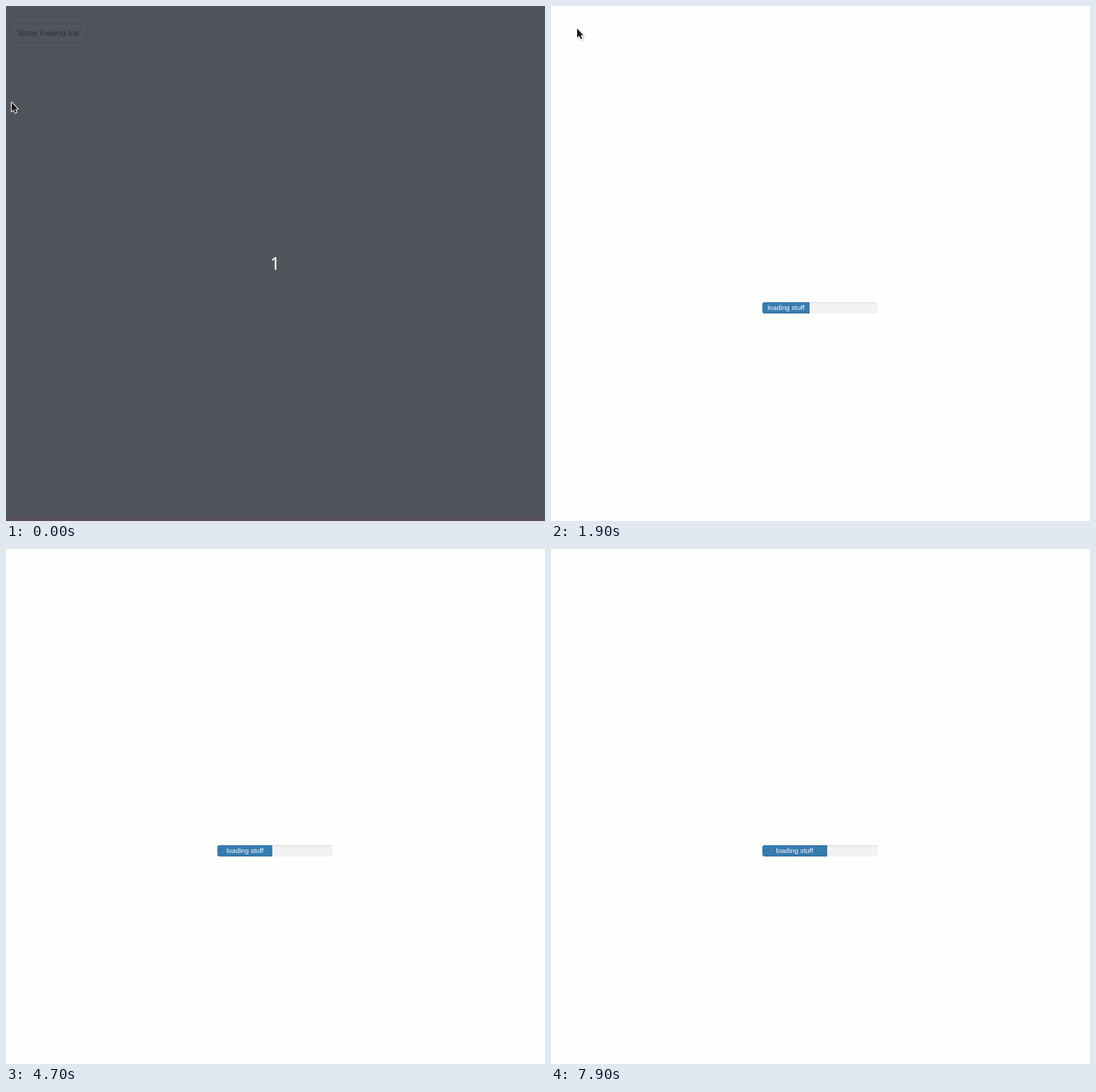
Recreate the animation shown at these times as an HTML page. Size 765 by 732 pixels, loop 8 s.

```html
<!DOCTYPE html>
<html lang="en">
<head>
<meta charset="utf-8">
<title>Loading bar</title>
<style>
  html, body {
    margin: 0;
    width: 100%;
    height: 100%;
    overflow: hidden;
  }
  body {
    position: relative;
    background: #fefefd;
    font-family: "Liberation Sans", Arial, sans-serif;
  }
  .button, .track, .cursor, .countdown { position: absolute; }
  .button, .track, .fill, .cursor, .countdown { animation: 8s linear infinite; }

  .button {
    left: 6px;
    top: 24.5px;
    box-sizing: border-box;
    width: 109px;
    height: 27.5px;
    border: 1px solid #ccc;
    border-radius: 3.3px;
    background: #fff;
    color: #333;
    font-size: 11.4px;
    line-height: 25.5px;
    text-align: center;
    white-space: nowrap;
    animation-name: press;
  }
  @keyframes press {
    0%, 9.9% { background: #fefefd; border-color: #ccc; visibility: visible; }
    10%, 12.4% { background: #e6e6e6; border-color: #adadad; visibility: visible; }
    12.5%, 100% { visibility: hidden; }
  }

  .track {
    left: 300px;
    top: 421px;
    width: 163px;
    height: 16.3px;
    border-radius: 3.3px;
    overflow: hidden;
    background: #f3f2f2;
    box-shadow: inset 0 1px 2px rgba(0, 0, 0, .1);
    animation-name: appear;
  }
  @keyframes appear {
    0%, 12.49% { visibility: hidden; }
    12.5%, 100% { visibility: visible; }
  }

  .fill {
    height: 100%;
    background: #367cae;
    box-shadow: inset 0 -1px rgba(0, 0, 0, .15);
    color: #fff;
    font-size: 9.8px;
    line-height: 16.3px;
    text-align: center;
    animation-name: load;
  }
  @keyframes load {
    0% { width: 0; }
    12.8% { width: 0; animation-timing-function: ease; }
    20.3% { width: 65.9px; }
    100% { width: 92px; }
  }

  .countdown {
    inset: 0;
    background: rgba(43, 47, 55, .82);
    animation-name: countdown;
  }
  .countdown::after {
    content: "";
    position: absolute;
    inset: auto 0 0;
    height: 4px;
    background: #594a5e;
  }
  .countdown text {
    fill: #fff;
    font: 25px "Noto Sans", "Open Sans", sans-serif;
    text-anchor: middle;
  }
  @keyframes countdown {
    0%, 1.24% { visibility: visible; }
    1.25%, 100% { visibility: hidden; }
  }

  .cursor {
    left: 0;
    top: 0;
    overflow: visible;
    filter: drop-shadow(1px 1px 1px rgba(0, 0, 0, .25));
    animation-name: point;
  }
  @keyframes point {
    0%, 4% { transform: translate(8px, 137px); animation-timing-function: ease-in-out; }
    11.25%, 30% { transform: translate(37px, 32px); }
    33.75%, 34.9% { transform: translate(38px, 4px); visibility: visible; }
    35%, 100% { transform: translate(38px, 4px); visibility: hidden; }
  }
</style>
</head>
<body>
  <div class="button">Show loading bar</div>
  <div class="track"><div class="fill">loading stuff</div></div>
  <div class="countdown">
    <svg width="765" height="732"><text x="382" y="375">1</text></svg>
  </div>
  <svg class="cursor" width="12" height="18">
    <path d="M0 0V13L3 10.3L5.2 15L7.2 14L5.1 9.5H9Z" fill="#1b1b1b"
      stroke="#fff" stroke-width="2" stroke-linejoin="round" paint-order="stroke"/>
  </svg>
</body>
</html>
```
